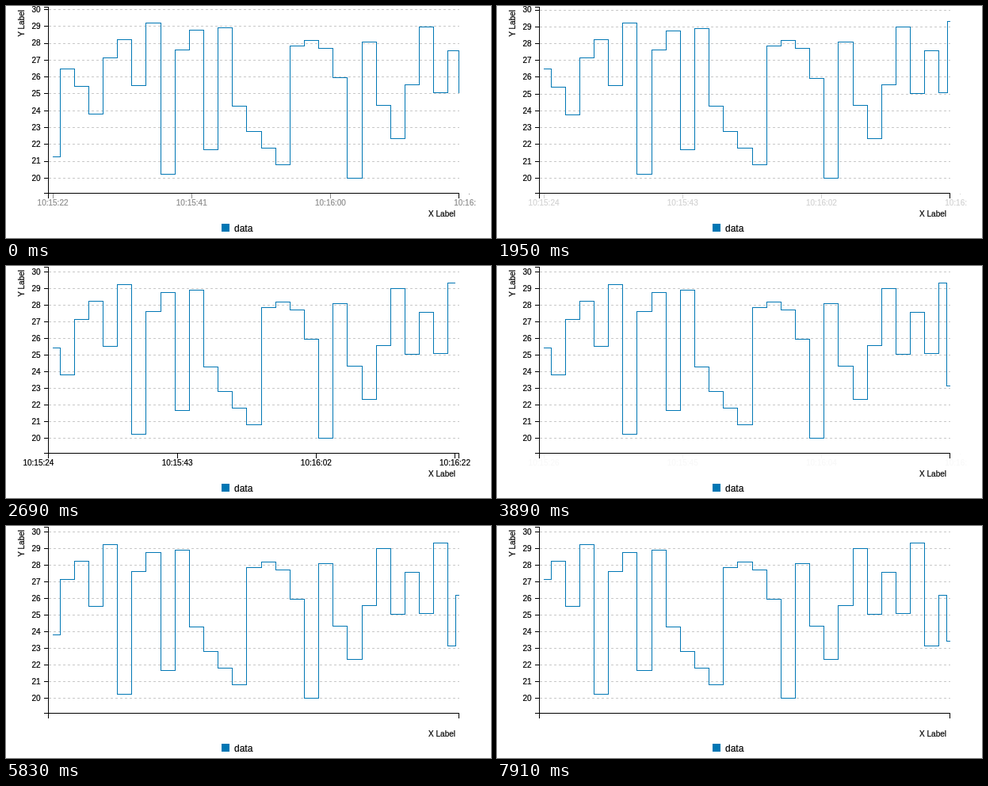
An HTML page for the animation above (8000 ms loop, 612 px wide and 293 px high).

```html
<!DOCTYPE html>
<html lang="en">
<head>
<meta charset="utf-8">
<title>Live step chart</title>
<style>
  html, body { margin: 0; width: 100%; height: 100%; overflow: hidden; background: #fff; }
  svg { display: block; width: 612px; height: 293px; }
  text { font: 10px "Liberation Sans", Arial, sans-serif; fill: #000; stroke: #000; stroke-width: .2px; }
  path, line { fill: none; stroke: #000; shape-rendering: crispEdges; }
  .grid { stroke: #c8c8c8; stroke-dasharray: 3 3; }
  .end { text-anchor: end; }
  .middle { text-anchor: middle; }
  #series { stroke: #0077b4; }
  #legend { font-size: 12px; }
</style>
</head>
<body>
<svg viewBox="0 0 612 293">
  <defs>
    <clipPath id="plotClip"><rect x="53" y="0" width="519" height="237"/></clipPath>
    <clipPath id="axisClip"><rect x="0" y="230" width="593" height="40"/></clipPath>
  </defs>
  <g id="yTicks"></g>
  <path id="series" clip-path="url(#plotClip)"/>
  <path d="M47.5 1.5H53.5V236.5H47.5"/>
  <path d="M53.5 243V236.5H571.5V243"/>
  <g clip-path="url(#axisClip)"><g id="xTicks"></g></g>
  <text class="end" transform="translate(22.5 5) rotate(-90)">Y Label</text>
  <text class="end" x="567" y="266">X Label</text>
  <rect x="272" y="275" width="10" height="10" fill="#0077b4" shape-rendering="crispEdges"/>
  <text id="legend" x="288" y="285">data</text>
</svg>
<script>
const LOOP = 8000;
const LEFT = 53.5, RIGHT = 571.5, TOP = 1.5, BOTTOM = 237;
const FIRST_X = 59, STEP = 508 / 28, WINDOW = 30;
const TICK_X = 40.9, TICK_GAP = 175.2;
const FADE_LEAD = 318, FADE = 176, SLIDE = 400;

const values = [
  21.24, 26.47, 25.43, 23.78, 27.14, 28.23, 25.5, 29.22, 20.21, 27.62,
  28.76, 21.68, 28.91, 24.29, 22.78, 21.8, 20.78, 27.85, 28.18, 27.7,
  25.94, 20, 28.09, 24.32, 22.33, 25.55, 28.98, 25.05, 27.57, 25.07,
  29.34, 23.12, 26.18, 23.44
];

// The chart repaints only at these moments.
const repaints = [
  0, 150, 300, 450, 600, 750,
  1950, 2100, 2250, 2390, 2540, 2690,
  3890, 4040, 4180, 4330, 4480, 4630,
  5830, 5970, 6120, 6260, 6410, 6560, 7910
];
const slideStarts = [233, 2206, 4175, 6145, 8233];

const clamp = v => Math.min(1, Math.max(0, v));
const lerp = (a, b, t) => a + (b - a) * t;
const cubicInOut = t => t < 0.5 ? 4 * t ** 3 : 1 - 4 * (1 - t) ** 3;
const byId = id => document.getElementById(id);

function add(parent, tag, attrs, content = "") {
  const node = document.createElementNS("http://www.w3.org/2000/svg", tag);
  for (const name in attrs) node.setAttribute(name, attrs[name]);
  node.textContent = content;
  return parent.appendChild(node);
}

// Value axis padded by a tenth of the data range on both sides.
function yScale(max, min = 20) {
  const range = max - min;
  const unit = (BOTTOM - TOP) / (range * 1.2);
  return v => BOTTOM - (v - min + range * 0.1) * unit;
}
const firstScale = yScale(29.22), laterScale = yScale(29.34);

const yTicks = Array.from({ length: 11 }, (_, i) => {
  const group = add(byId("yTicks"), "g", {});
  add(group, "line", { class: "grid", x1: LEFT, x2: RIGHT });
  add(group, "line", { x1: 47.5, x2: LEFT });
  add(group, "text", { class: "end", x: 43.7, y: 3.4 }, 20 + i);
  return { group, value: 20 + i };
});

const xTicks = Array.from({ length: 4 }, () => {
  const group = add(byId("xTicks"), "g", {});
  return {
    group,
    mark: add(group, "line", { y1: 236.5 }),
    label: add(group, "text", { class: "middle", y: 251.7 })
  };
});
const tickSeconds = [22, 41, 60, 80];

function clock(seconds) {
  const minute = 15 + Math.floor(seconds / 60);
  return `10:${minute}:${String(seconds % 60).padStart(2, "0")}`;
}

function stepPath(points, x, lag, y) {
  const last = points.length - 1;
  let d = `M${x} ${y(points[0])}`;
  for (let i = 1; i <= last; i++) {
    const edge = x + STEP * (i - 0.5) - (i === last ? lag : 0);
    d += `H${edge}V${y(points[i])}`;
  }
  return `${d}H${x + STEP * last}`;
}

function draw(time) {
  const now = repaints.findLast(t => t <= time);
  const cycle = Math.floor(repaints.indexOf(now) / 6);
  const sinceSlide = now - slideStarts[cycle];
  const fade = cubicInOut(clamp((sinceSlide + FADE_LEAD) / FADE));
  const slide = clamp(sinceSlide / SLIDE);
  const settled = slide === 1;
  const shift = STEP * (1 - slide);

  const zoom = cycle === 0 ? 0 : cycle === 1 ? fade : 1;
  const y = v => lerp(firstScale(v), laterScale(v), zoom);
  for (const tick of yTicks) {
    tick.group.setAttribute("transform", `translate(0 ${y(tick.value)})`);
  }

  const points = values.slice(cycle + (settled ? 1 : 0), cycle + WINDOW);
  const startX = settled ? FIRST_X : FIRST_X - STEP + shift;
  const lag = settled ? 0 : (1 - fade) * STEP / 2;
  byId("series").setAttribute("d", stepPath(points, startX, lag, y));

  byId("xTicks").setAttribute("opacity", fade);
  xTicks.forEach(({ group, mark, label }, i) => {
    const x = TICK_X + TICK_GAP * i + shift;
    const length = settled ? (x > LEFT ? 6.5 : 0) : (i === 3 ? 1 : 6.5);
    group.setAttribute("transform", `translate(${x} 0)`);
    mark.setAttribute("y2", 236.5 + length);
    label.textContent = clock(tickSeconds[i] + 2 * cycle);
  });
}

const start = performance.now();
function frame() {
  draw((performance.now() - start) % LOOP);
  requestAnimationFrame(frame);
}
frame();
</script>
</body>
</html>
```
